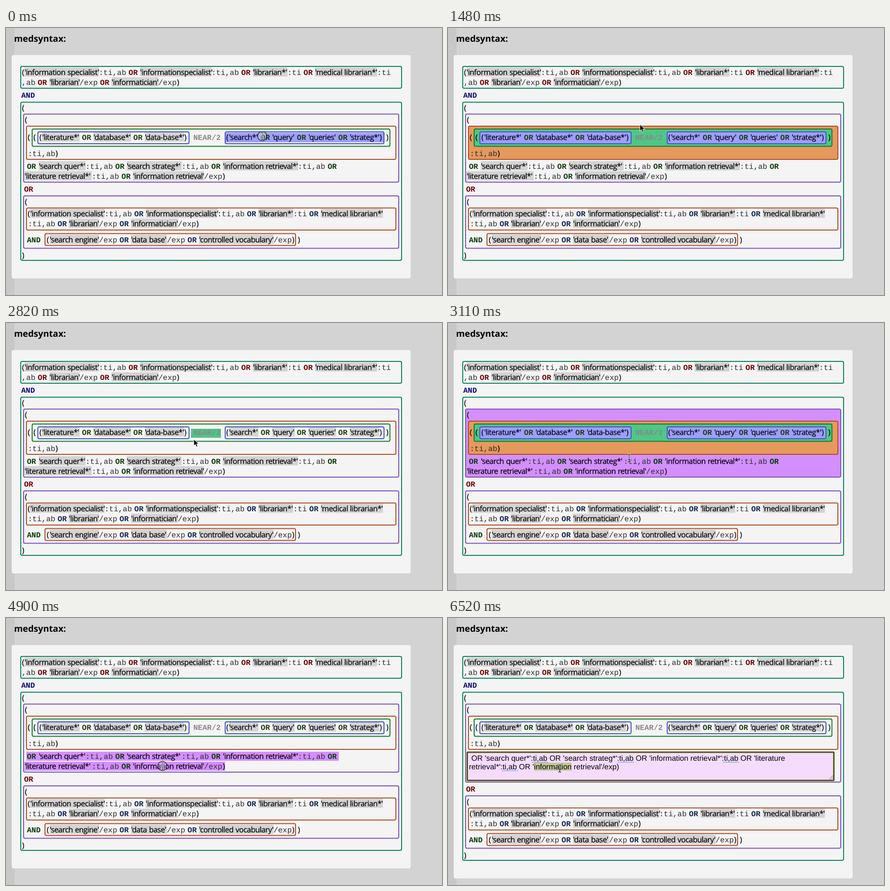
These frames come from a looping animation (917 by 563 pixels, 8000 ms). An HTML page:

```html
<!DOCTYPE html>
<html lang="en">
<head>
<meta charset="utf-8">
<title>medsyntax</title>
<style>
  html, body { margin: 0; width: 100%; height: 100%; overflow: hidden; background: #d3d3d3; }
  svg { display: block; }
  text { font: 16px "Open Sans", "Noto Sans", sans-serif; white-space: pre; text-rendering: geometricPrecision; }
  .quote { letter-spacing: -.52px; word-spacing: .8px; stroke: #000; stroke-width: .25px; }
  .mono { font-family: "Liberation Mono", monospace; fill: #2c2c2c; }
  .op { font-family: "Liberation Mono", monospace; font-weight: 700; }
  .title { font-size: 18.72px; font-weight: 700; }
  .field { font-family: "Liberation Sans", Arial, sans-serif; }
  .term { fill: #d3d3d3; }
  .lit .term { display: none; }
</style>
</head>
<body>
<svg id="stage" width="917" height="563" viewBox="0 0 917 563"></svg>
<script>
const LOOP = 8000, STEP = 148, GROW = 21;
const PURPLE = '#d48fff', ORANGE = '#e6995c', GREEN = '#4fc686', BLUE = '#9e9eff';
const LINE = { teal: '#08835c', purple: '#7c50bd', rust: '#b04c26', green: '#107d2c', blue: '#4054c6' };
const RED = '#6e0000', NAVY = '#0c0c72', FOREST = '#0b3a0b', MOSS = '#1d3d08', INK = '#10244f', GREY = '#888';

function add(parent, tag, attrs = {}, content = '') {
  const el = document.createElementNS('http://www.w3.org/2000/svg', tag);
  for (const key in attrs) el.setAttribute(key, attrs[key]);
  el.textContent = content;
  return parent.appendChild(el);
}
const group = parent => add(parent, 'g');
const show = (el, on) => el.setAttribute('visibility', on ? 'visible' : 'hidden');

function rect(parent, left, top, right, bottom, fill, extra = {}) {
  return add(parent, 'rect', { x: left, y: top, width: right - left, height: bottom - top, fill, ...extra });
}
function box(parent, left, top, right, bottom, stroke) {
  return rect(parent, left, top, right, bottom, 'none', { stroke, 'stroke-width': 2, rx: 3 });
}
function grow(el, base, on) {
  el.setAttribute('height', base + (on ? GROW : 0));
}

const isQuote = token => token[0] === "'";
const isParen = token => token === '(' || token === ')';
const advance = token => token === ' ' ? 5 : isParen(token) ? 6.1 : 9.6 * token.length;

// Lays out one line of a query; starts holds the left edge of each quoted term.
function row(parent, x, y, line, color, starts = []) {
  const tokens = line.match(/'[^']*'|OR|AND|NEAR\/2|[()]|[:,\/][a-z,]+| /g);
  let term = 0;
  tokens.forEach((token, i) => {
    if (isQuote(token)) {
      const left = starts[term++];
      const back = rect(parent, left, y - 16, left, y + 3.3, '', { class: 'term' });
      const text = add(parent, 'text', { x: left, y, class: 'quote' }, token);
      const next = tokens.findIndex((t, j) => j > i && isQuote(t));
      x = next < 0
        ? left + text.getComputedTextLength()
        : starts[term] - tokens.slice(i + 1, next).reduce((sum, t) => sum + advance(t), 0);
      back.setAttribute('width', x - left);
      return;
    }
    if (isParen(token)) {
      add(parent, 'text', { x: x + .7, y, class: 'quote' }, token);
    } else if (token !== ' ') {
      const op = /[A-Z]/.test(token);
      add(parent, 'text', op ? { x, y, class: 'op', fill: color } : { x, y, class: 'mono' }, token);
    }
    x += advance(token);
  });
}

const stage = document.getElementById('stage');
rect(stage, 0, 0, 18, 563, '#c8c8c8');
add(stage, 'text', { x: 17, y: 29, class: 'title' }, 'medsyntax:');
const panel = rect(stage, 12, 57, 851, 528, '#f4f4f4', { rx: 4 });

box(stage, 31, 81, 832, 127, LINE.teal);
row(stage, 33, 99, "('information specialist':ti,ab OR 'informationspecialist':ti,ab OR 'librarian*':ti OR 'medical librarian*':ti", RED, [39, 282, 519, 650]);
row(stage, 33, 120, ",ab OR 'librarian'/exp OR 'informatician'/exp)", RED, [91.5, 222]);
row(stage, 32, 147, 'AND', NAVY);

const outer = box(stage, 31, 156.5, 832, 490, LINE.teal);
const purple = box(stage, 37, 181.5, 826, 325, LINE.purple);
const orange = box(stage, 43, 207, 820, 277, LINE.rust);
const green = box(stage, 55, 213, 807.5, 249.5, LINE.green);
const blues = [[67, 385], [461, 795]].map(([l, r]) => box(stage, l, 219, r, 244, LINE.blue));
row(stage, 33, 174, '(');
row(stage, 39, 199, '(');
row(stage, 45, 236, '(');
row(stage, 57, 236, '(');

const left = group(stage);
row(left, 69.5, 236, "('literature*' OR 'database*' OR 'data-base*')", MOSS, [76, 184, 292]);
const nearGlow = rect(stage, 389, 223, 452, 242, GREEN);
row(stage, 394, 236, 'NEAR/2', GREY);
const right = group(stage);
const searchGlow = rect(right, 462, 221, 794, 241, BLUE);
row(right, 462.5, 236, "('search*' OR 'query' OR 'queries' OR 'strateg*')", MOSS, [469, 560, 636, 723]);
row(stage, 799, 236, ')');
row(stage, 46, 270, ':ti,ab)');

const lines = group(stage);
const lineGlow = group(lines);
rect(lineGlow, 43, 282, 700, 301, PURPLE);
rect(lineGlow, 39, 303, 461, 322, PURPLE);
row(lines, 44, 297, "OR 'search quer*':ti,ab OR 'search strateg*':ti,ab OR 'information retrieval*':ti,ab OR", FOREST, [69, 254, 456]);
row(lines, 39, 318, "'literature retrieval*':ti,ab OR 'information retrieval'/exp)", FOREST, [39, 267]);

const lower = group(stage);
row(lower, 38, 345, 'OR', RED);
box(lower, 37, 354, 826, 464.5, LINE.purple);
row(lower, 39, 372, '(');
box(lower, 43, 379.5, 820, 426, LINE.rust);
row(lower, 45, 397, "('information specialist':ti,ab OR 'informationspecialist':ti,ab OR 'librarian*':ti OR 'medical librarian*'", INK, [51, 294, 531, 662]);
row(lower, 46, 418, ":ti,ab OR 'librarian'/exp OR 'informatician'/exp)", INK, [132, 263]);
row(lower, 44, 452, 'AND', FOREST);
box(lower, 82, 433.5, 609, 458.5, LINE.rust);
row(lower, 85, 452, "('search engine'/exp OR 'data base'/exp OR 'controlled vocabulary'/exp)", INK, [92, 263, 406]);
row(lower, 613, 452, ')');
row(lower, 33, 485, ')');

const editor = group(stage);
const field = rect(editor, 40.5, 283, 811.5, 342.5, '#f5dcff', { rx: 1 });
const selection = rect(editor, 181, 305, 260, 322, '#c3c79a');
add(editor, 'text', { x: 49, y: 301, class: 'field' },
  "OR 'search quer*':ti,ab OR 'search strateg*':ti,ab OR 'information retrieval*':ti,ab OR 'literature");
add(editor, 'text', { x: 44, y: 319, class: 'field' }, "retrieval*':ti,ab OR 'information retrieval'/exp)");
add(editor, 'path', { d: 'M802 340l8-8M806 340l4-4', stroke: '#666', 'stroke-width': 1 });
const squiggles = add(editor, 'path', {
  d: 'M178 304h31M359 304h31M580 304h31M115 322h31', fill: 'none', stroke: '#3c86e8',
  'stroke-width': 2, 'stroke-dasharray': '0 3.4', 'stroke-linecap': 'round'
});

const pointer = group(stage);
const arrow = add(pointer, 'path', {
  d: 'M0 0V14L3.2 11L5.5 16.2L8 15.1L5.8 10H10.2Z', fill: '#000', stroke: '#fff', 'stroke-width': 1
});
const beam = group(pointer);
for (const [stroke, width] of [['#fff', 2.6], ['#000', 1.1]]) {
  add(beam, 'path', {
    d: 'M-3-8Q0-8 0-6V6Q0 8-3 8M3-8Q0-8 0-6M0 6Q0 8 3 8M-2 3H2', fill: 'none', stroke, 'stroke-width': width
  });
}
const ring = add(pointer, 'circle', { r: 9.7, fill: '#fff', 'fill-opacity': .2, stroke: '#000', 'stroke-width': 1.1 });

// Pointer stops: [step, x, y]
const path = [
  [0, 539, 228], [1, 536, 228], [3, 472, 226], [5, 425, 226], [7, 425, 226], [8, 421, 222],
  [11, 395, 194], [13, 395, 194], [14, 397, 196], [15, 397, 196], [16, 398, 197], [19, 395, 245],
  [21, 381, 285], [23, 399, 293], [30, 329, 312], [35, 329, 312], [38, 263, 320], [40, 235, 317], [54, 235, 317]
];
// Hovered part from each step on
const hovers = [
  [0, 'search'], [4, 'near'], [9, 'green'], [10, 'orange'], [11, 'purple'], [17, 'orange'],
  [18, 'near'], [20, 'orange'], [21, 'purple'], [23, 'lines'], [34, 'edit']
];
const nesting = ['blue', 'green', 'orange', 'purple'];

function pointerAt(step) {
  const i = Math.max(1, path.findIndex(p => p[0] >= step));
  const [a, x0, y0] = path[i - 1], [b, x1, y1] = path[i];
  const k = (step - a) / (b - a);
  return [x0 + (x1 - x0) * k, y0 + (y1 - y0) * k];
}

function draw(time) {
  const step = Math.min(54, Math.floor((time % LOOP + 8) / STEP));
  const hover = hovers.filter(h => h[0] <= step).pop()[1];
  const level = nesting.indexOf(hover);
  const editing = hover === 'edit', focused = step >= 42;

  purple.setAttribute('fill', level > 2 ? PURPLE : 'none');
  orange.setAttribute('fill', level > 1 ? ORANGE : 'none');
  green.setAttribute('fill', level > 0 ? GREEN : 'none');
  for (const b of blues) b.setAttribute('fill', level > 0 ? BLUE : 'none');
  left.classList.toggle('lit', level > 0);
  right.classList.toggle('lit', level > 0 || hover === 'search');
  lines.classList.toggle('lit', level > 2 || hover === 'lines');
  show(searchGlow, hover === 'search');
  show(nearGlow, hover === 'near');
  show(lineGlow, hover === 'lines');

  lines.style.display = editing ? 'none' : '';
  editor.style.display = editing ? '' : 'none';
  grow(panel, 471, editing);
  grow(outer, 333.5, editing);
  grow(purple, 143.5, editing);
  lower.setAttribute('transform', `translate(0 ${editing ? GROW : 0})`);
  field.setAttribute('stroke', focused ? '#4b5a10' : '#767676');
  field.setAttribute('stroke-width', focused ? 3 : 1);
  show(selection, step >= 43);
  show(squiggles, focused);

  const isArrow = step >= 4 && step < 21;
  pointer.setAttribute('transform', `translate(${pointerAt(step)})`);
  show(arrow, isArrow);
  show(beam, !isArrow);
  show(ring, [0, 33, 42, 43].includes(step));
}

const start = performance.now();
function tick() {
  draw(performance.now() - start);
  requestAnimationFrame(tick);
}
tick();
</script>
</body>
</html>
```
